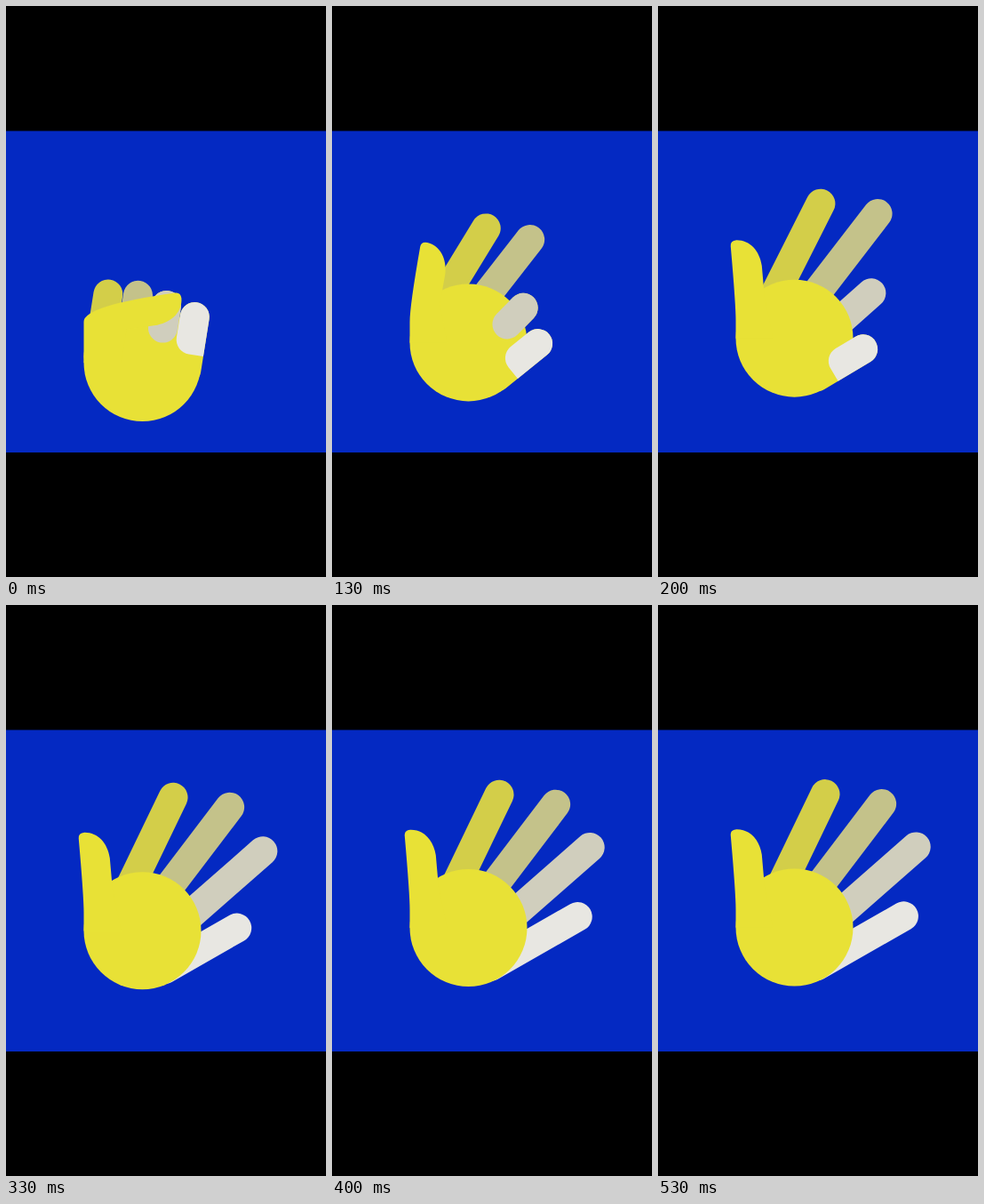
Animation, 360 px wide and 642 px high, one loop 600 ms. Source, as an HTML page:

```html
<!DOCTYPE html>
<html lang="en">
<head>
<meta charset="utf-8">
<title>Opening hand</title>
<style>
  html, body { margin: 0; width: 100%; height: 100%; overflow: hidden; background: #000; }
  svg { display: block; width: 100%; height: 100%; }
  line { stroke-width: 33; stroke-linecap: round; }
</style>
</head>
<body>
<svg viewBox="0 0 360 642">
  <rect width="360" height="642" fill="#000"/>
  <rect y="140.5" width="360" height="361.5" fill="#0429c2"/>
  <g id="hand">
    <g id="back"></g>
    <circle id="palm" r="66"/>
    <g id="front"></g>
    <path id="thumb"/>
  </g>
</svg>
<script>
const LOOP = 600, STEPS = 9;
const YELLOW = '#e8e136';

// closed, open: reach from the palm centre; start, span: when it unfolds, in steps.
const FINGERS = [
  { color: '#d3ce49', closed: 70, open: 150, start: 0.25, span: 3 },
  { color: '#c4c28a', closed: 74, open: 170, start: 0.25, span: 3 },
  { color: '#d0cebd', closed: 68, open: 162.5, start: 1.6, span: 3.7, folds: true },
  { color: '#e8e7e2', closed: 60, open: 113, start: 3.4, span: 2.7, folds: true }
];

const $ = id => document.getElementById(id);
const clamp = v => Math.min(1, Math.max(0, v));
const mix = (a, b, p) => a + (b - a) * p;
const easeOut = (p, power) => 1 - (1 - clamp(p)) ** power;

function smooth(p) {
  p = clamp(p);
  return p * p * (3 - 2 * p);
}

function add(parent, tag) {
  const el = document.createElementNS('http://www.w3.org/2000/svg', tag);
  return parent.appendChild(el);
}

function set(el, attrs) {
  for (const name in attrs) el.setAttribute(name, attrs[name]);
}

FINGERS.forEach((f, i) => {
  f.back = add($('back'), 'line');
  if (!f.folds) return;
  // The outermost finger keeps a square heel along the edge of the hand.
  const heel = i === 3 ? 'V42.5 H0' : 'V26 A16.5 16.5 0 0 1 0 42.5';
  f.front = add($('front'), 'path');
  set(f.front, {
    fill: f.color,
    d: `M-16.5 0 A16.5 16.5 0 0 1 16.5 0 ${heel} A16.5 16.5 0 0 1 -16.5 26 Z`
  });
});
set($('palm'), { fill: YELLOW });
set($('thumb'), { fill: YELLOW });

// The fingers turn together, fan out, and move closer at the knuckles.
function drawFinger(f, i, step) {
  const fan = 11.5 * smooth((step - 0.2) / 3.3);
  const lean = mix(9, 43, easeOut(step / 3, 2.7)) + (i - 1.5) * fan;
  const gap = mix(33.4, 28, smooth((step - 2) / 2));
  const x = 50 - (3 - i) * gap;
  const unfold = smooth((step - f.start) / f.span);
  const reach = mix(f.closed, f.open, unfold);
  const folded = f.folds && unfold < 0.2;
  set(f.back, {
    x1: x, y1: -reach, x2: x, y2: 0,
    transform: `rotate(${lean})`,
    stroke: folded ? YELLOW : f.color
  });
  if (f.front) set(f.front, {
    transform: `rotate(${lean}) translate(${x} ${-reach})`,
    visibility: folded ? 'visible' : 'hidden'
  });
}

function drawThumb(step) {
  const deg = mix(82, -5, easeOut(step / 3, 1.6));
  const curl = Math.max(0, deg) / 82;
  const s = Math.sin(deg * Math.PI / 180), c = Math.cos(deg * Math.PI / 180);
  const left = -66, bend = -38 - 26 * curl;
  const length = 66 + 38 * curl ** 1.5;
  // Point at a distance along and across the thumb, measured from its tip.
  const at = (along, across) => {
    const up = length + along;
    return `${left + s * up + c * across} ${bend - c * up + s * across}`;
  };
  set($('thumb'), {
    d: `M${left} 0 V${bend + 18} Q${left} ${bend} ${at(0, 0)}` +
       `Q${at(6, 0)} ${at(6, 7)} C${at(5, 22)} ${at(-8, 32)} ${at(-25, 33)}` +
       `L${at(-60, 33)} L-24 0 Z`
  });
}

function draw(ms) {
  let step = STEPS - 1;
  while (step && Math.round(step * LOOP / STEPS / 10) * 10 > ms) step--;
  const y = mix(401, 362.5, clamp(step / 6.2) ** 0.47);
  set($('hand'), { transform: `translate(153.5 ${y})` });
  FINGERS.forEach((f, i) => drawFinger(f, i, step));
  drawThumb(step);
}

const start = performance.now();
function tick() {
  draw((performance.now() - start) % LOOP);
  requestAnimationFrame(tick);
}
tick();
</script>
</body>
</html>
```
